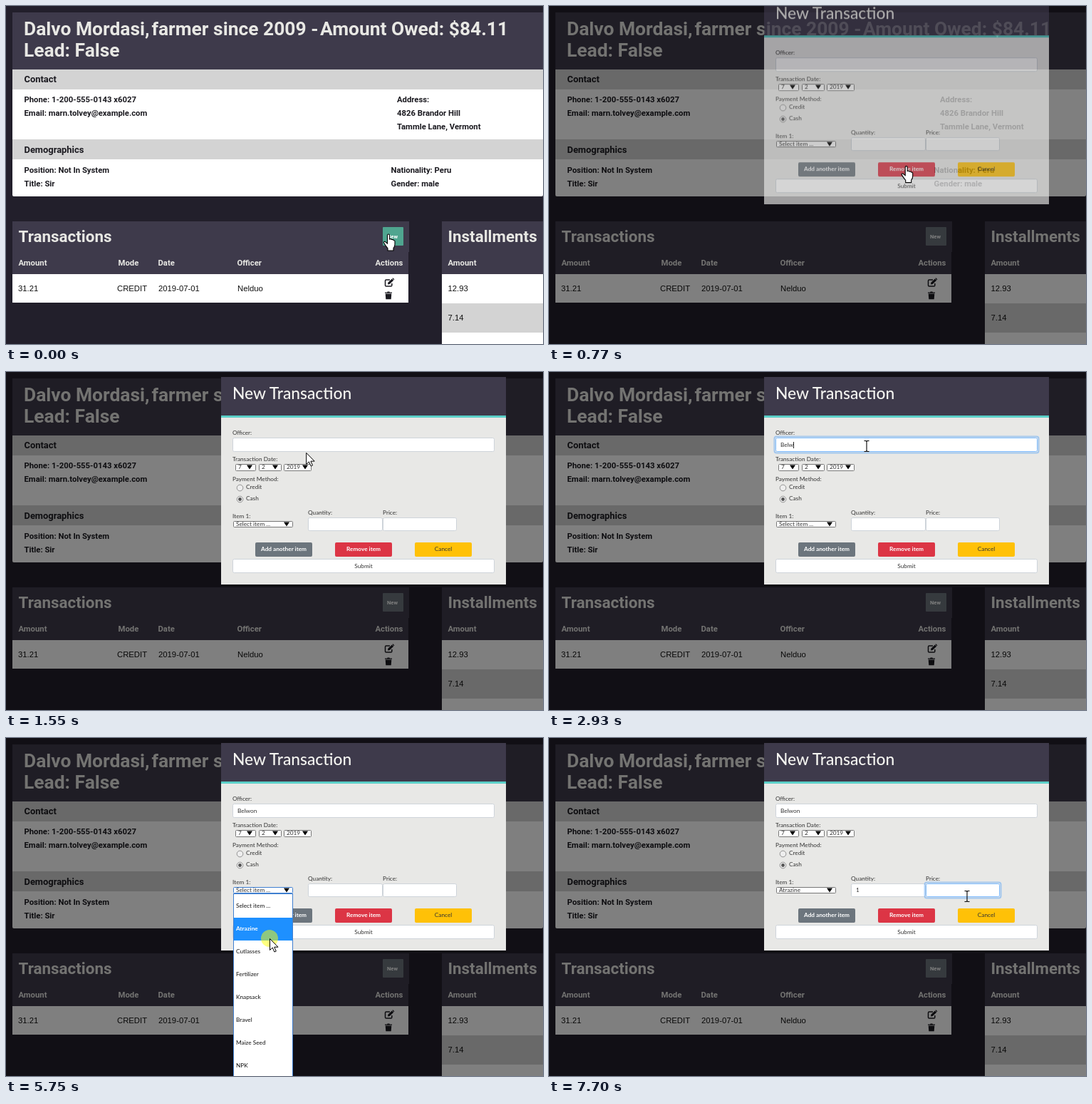
Animation of 754 by 474 pixels, one loop 8 s. Source, as an HTML page:

```html
<!DOCTYPE html>
<html lang="en">
<head>
<meta charset="utf-8">
<title>New transaction form</title>
<style>
  html, body { margin: 0; width: 100%; height: 100%; overflow: hidden; background: #221f2b; }
  svg { display: block; width: 754px; height: 474px; }
  text { white-space: pre; }
  .bold { font-family: Roboto, sans-serif; font-weight: 700; }
  .cell { font: 11.3px "Liberation Sans", Arial, sans-serif; fill: #111; }
  .form { font-family: Lato, sans-serif; }
</style>
</head>
<body>
<svg id="stage" viewBox="0 0 754 474" xmlns="http://www.w3.org/2000/svg"></svg>
<script>
const LOOP = 8000;
const PANEL = '#3e3a4b', LIGHT = '#e8e8e4', DARK = '#1b1a20', GREY = '#d3d3d3';
const OFFICER = 'Belwon';
const ITEMS = ['Select item ...', 'Atrazine', 'Cutlasses', 'Fertilizer', 'Knapsack', 'Bravel', 'Maize Seed', 'NPK'];

const rect = (x, y, w, h, fill, extra = '') =>
  `<rect x="${x}" y="${y}" width="${w}" height="${h}" fill="${fill}" ${extra}/>`;
const bold = (x, y, size, str, fill = DARK) =>
  `<text class="bold" x="${x}" y="${y}" font-size="${size}" fill="${fill}">${str}</text>`;
const cell = (x, y, str) => `<text class="cell" x="${x}" y="${y}">${str}</text>`;
const form = (x, y, str, extra = '') =>
  `<text class="form" x="${x}" y="${y}" font-size="8.25" fill="#333" ${extra}>${str}</text>`;

const field = (id, x, y, w, h) =>
  rect(x - 1.5, y - 1.5, w + 3, h + 3, 'none', `id="${id}Ring" rx="3" stroke="#007bff" stroke-opacity=".3" stroke-width="2"`) +
  rect(x + .5, y + .5, w - 1, h - 1, '#fff', `id="${id}" rx="2" stroke="#ced4da"`);
const select = (x, y, w, h, str, id = 'pick' + x) =>
  rect(x + .5, y + .5, w - 1, h - 1, '#fff', `id="${id}" rx="1" stroke="#777"`) +
  form(x + 4, y + 7.4, str, `id="${id}Text"`) +
  `<path d="M${x + w - 13} ${y + 1.5}h8l-4 6z" fill="#000"/>`;
const button = (x, fill, str, ink, weight) =>
  rect(x, 239, 80, 20, fill, 'rx="2"') +
  form(x + 40, 251, str, `text-anchor="middle" style="fill:${ink};font-weight:${weight}"`);
const radio = (y, str, on) =>
  `<circle cx="328.5" cy="${y}" r="4.3" fill="#eee" stroke="#888" stroke-width=".9"/>` +
  (on ? `<circle cx="328.5" cy="${y}" r="2.4" fill="#555"/>` : '') + form(337, y + 1.6, str);

const profile =
  rect(9, 9, 745, 80, PANEL) + rect(9, 89, 745, 178, '#fff', 'rx="2"') +
  rect(9, 89, 745, 28, GREY) + rect(9, 187, 745, 28, GREY) +
  bold(25, 41, 26.4, 'Dalvo Mordasi,', LIGHT) + bold(204.5, 41, 26.4, 'farmer since 2009 -', LIGHT) +
  bold(441, 41, 26.4, 'Amount Owed: $84.11', LIGHT) + bold(25, 71, 26.4, 'Lead: False', LIGHT) +
  bold(25.5, 107, 12.9, 'Contact') + bold(25.5, 206, 12.9, 'Demographics') +
  [[25.5, 135, 'Phone: 1-200-555-0143 x6027'], [25.5, 154, 'Email: marn.tolvey@example.com'],
   [549, 135, 'Address:'], [549, 154, '4826 Brandor Hill'], [549, 173, 'Tammle Lane, Vermont'],
   [25.5, 234, 'Position: Not In System'], [25.5, 253, 'Title: Sir'],
   [540.5, 234, 'Nationality: Peru'], [540.5, 253, 'Gender: male']]
    .map(([x, y, str]) => bold(x, y, 11.3, str)).join('');

const editIcon = `<path d="M539 384h-5.2q-1.300 0-1.300 1.300v6.400q0 1.300 1.300 1.300h6.700q1.300 0 1.300-1.300V389" fill="none" stroke="${DARK}" stroke-width="1.500"/>
  <path d="M536 390.500l.4-2.700 5.500-5.400 2.300 2.300-5.500 5.400z" fill="${DARK}"/><path d="M542.400 382l.9-.7 2 2-.8.9z" fill="${DARK}"/>`;
const trashIcon = `<path d="M532 401.500h3l.7-1h2.600l.7 1h3v1.300h-10zM532.700 403.600h8.600l-.6 7.600h-7.400z" fill="${DARK}"/>`;

const tables =
  rect(9, 302, 557, 43, PANEL) + rect(9, 345, 556, 31, PANEL) + rect(9, 376, 556, 40, '#fff') +
  bold(17.500, 330.500, 22.4, 'Transactions', LIGHT) +
  [[17.500, 'Amount'], [157.500, 'Mode'], [213.500, 'Date'], [324.500, 'Officer'], [518.500, 'Actions'], [620.500, 'Amount']]
    .map(([x, str]) => [x, str]);
const heads = [[17.5, 'Amount'], [157.5, 'Mode'], [213.5, 'Date'], [324.5, 'Officer'], [518.5, 'Actions'], [620.5, 'Amount']]
  .map(([x, str]) => bold(x, 364, 11.3, str, LIGHT)).join('');

const lists =
  rect(9, 302, 557, 43, PANEL) + rect(9, 345, 556, 31, PANEL) + rect(9, 376, 556, 40, '#fff') +
  rect(612, 302, 142, 74, PANEL) + rect(612, 376, 142, 98, '#fff') + rect(612, 417, 142, 41, GREY) +
  bold(17.5, 330.5, 22.4, 'Transactions', LIGHT) + bold(620.5, 330.5, 22.4, 'Installments', LIGHT) + heads +
  cell(17, 400, '31.21') + cell(156, 400, 'CREDIT') + cell(214, 400, '2019-07-01') + cell(325, 400, 'Nelduo') +
  cell(620.5, 400, '12.93') + cell(620.5, 441, '7.14') + editIcon + trashIcon +
  rect(529, 310, 29, 26, '#6c757d', 'id="newButton" rx="1"') + bold(535, 326, 7.6, 'New', '#fff');

const modal =
  rect(302, 7, 400, 291, '#e8e8e6') + rect(302, 7, 400, 54, PANEL) + rect(302, 61, 400, 3, '#5bcfc8') +
  `<text class="form" x="318" y="38" font-size="22.8" font-weight="500" fill="#f4f4f0">New Transaction</text>` +
  form(318, 88, 'Officer:') + field('officer', 318, 92, 368, 20) + form(325, 104.5, '', 'id="officerText"') +
  form(318, 124.5, 'Transaction Date:') +
  select(322, 129, 29, 10, '7') + select(355, 129, 32, 10, '2') + select(390, 129, 39, 10, '2019') +
  form(318, 152.5, 'Payment Method:') + radio(162.5, 'Credit') + radio(178.5, 'Cash', true) +
  form(318, 204.5, 'Item 1:') + form(424, 200, 'Quantity:') + form(529, 200, 'Price:') +
  select(319, 209, 84, 9, ITEMS[0], 'item') +
  field('qty', 424, 204, 105, 19) + field('price', 529, 204, 104, 19) + form(431, 216, '', 'id="qtyText"') +
  button(350, '#6c757d', 'Add another item', '#fff', 700) +
  button(462, '#dc3545', 'Remove item', '#fff', 700) +
  button(574, '#ffc107', 'Cancel', '#333', 400) +
  rect(318.5, 262.5, 367, 19, '#fff', 'rx="2" stroke="#ced4da"') +
  form(502, 274.5, 'Submit', 'text-anchor="middle"') +
  rect(0, 98, 1, 9, '#222', 'id="caret"');

const menu =
  rect(319.5, 218.5, 83, 270, '#fff', 'stroke="#3f7fd0"') +
  rect(320, 0, 82, 32, '#1e90ff', 'id="hover"') +
  ITEMS.map((str, i) => form(323, 238 + 32 * i, str, `id="option${i}"`)).join('');

const pointers = `
  <path id="arrow" d="M.5.5V16.500l3.700-3.500 2.700 6 2.400-1-2.600-5.800H12z" fill="#fff" stroke="#000" stroke-width="1"/>
  <path id="hand" d="M-1.500 13V1.800Q-1.500 0 0 0t1.500 1.800V7q1.700-1 3 .6 1.700-.6 2.500.9 2-.2 2 1.800v4.200q0 2.500-2 5V23h-8v-3.200q-3-3.500-5.500-7.800-.5-2 1.700-1.600z"
    fill="#fff" stroke="#000" stroke-width="1.100"/>
  <path id="beam" d="M-3.500-7.500h2.500l1 1 1-1h2.500M0-6.500V7M-3.500 7.500h2.500l1-1 1 1h2.500" fill="none" stroke="#000" stroke-width="1.100"/>`;

document.getElementById('stage').innerHTML =
  rect(0, 0, 754, 474, '#221f2b') + profile + lists +
  rect(0, 0, 754, 474, '#000', 'id="shade"') +
  `<g id="modal">${modal}</g><g id="menu">${menu}</g>` +
  `<g id="pointer"><circle id="halo" r="12" fill="#ff0" fill-opacity=".5"/>${pointers}</g>`;

const $ = id => document.getElementById(id);
const set = (id, name, value) => $(id).setAttribute(name, value);
const show = (id, on) => set(id, 'visibility', on ? 'visible' : 'hidden');
const clamp = v => Math.max(0, Math.min(1, v));
const within = (t, spans) => spans.some(([a, b]) => t >= a && t < b);

// time, x, y, pointer shape from that time on
const PATH = [
  [0, 537, 320, 'hand'], [310, 537, 320, 'hand'], [400, 535, 309, 'arrow'], [610, 528, 290, 'arrow'],
  [730, 509, 242, 'hand'], [770, 502, 225, 'hand'], [840, 482, 194, 'arrow'], [1080, 434, 134, 'arrow'],
  [1150, 423, 120, 'arrow'], [1400, 423, 120, 'arrow'], [1550, 421, 113, 'arrow'], [1625, 434, 106, 'beam'],
  [1700, 446, 104, 'beam'], [4020, 446, 104, 'beam'], [4100, 425, 120, 'arrow'], [4260, 378, 162, 'arrow'],
  [4400, 378, 162, 'arrow'], [4500, 372, 203, 'arrow'], [4720, 372, 203, 'arrow'], [4800, 371, 213, 'arrow'],
  [5040, 371, 213, 'arrow'], [5520, 370, 280, 'arrow'], [5600, 370, 281, 'arrow'], [5910, 370, 281, 'arrow'],
  [6130, 440, 224, 'beam'], [6220, 478, 214, 'beam'], [6840, 478, 214, 'beam'], [7000, 587, 222, 'beam'],
  [LOOP, 587, 222, 'beam']
];
const CLICKS = [[80, 310], [1630, 1780], [4800, 4880], [5750, 5910], [6230, 6380], [7150, 7320]];
const KEYS = [2710, 2780, 2860, 2930, 3160, 3240];
const FOCUS = { officer: [1700, 4800], qty: [6300, 7230], price: [7230, LOOP] };
const CARET = [[1700, 2240], [2710, 3710], [4210, 4800], [6300, 7700]];

function pointerAt(t) {
  const i = PATH.findIndex((key, k) => t < PATH[k + 1][0]);
  const [t0, x0, y0, shape] = PATH[i], [t1, x1, y1] = PATH[i + 1];
  const p = (t - t0) / (t1 - t0);
  return { x: x0 + (x1 - x0) * p, y: y0 + (y1 - y0) * p, shape };
}

function draw(t) {
  const { x, y, shape } = pointerAt(t);
  set('pointer', 'transform', `translate(${x.toFixed(1)} ${y.toFixed(1)})`);
  for (const id of ['arrow', 'hand', 'beam']) show(id, id === shape);
  show('halo', within(t, CLICKS));
  set('newButton', 'fill', t < 80 ? '#4fa58f' : t < 310 ? '#489883' : t < 400 ? '#4fa58f' : '#6c757d');

  set('shade', 'opacity', .5 * clamp((t - 525) / 150));
  const slide = 1 - (1 - clamp((t - 660) / 300)) ** 2;
  set('modal', 'opacity', clamp((t - 660) / 165));
  set('modal', 'transform', `translate(0 ${(-50 * (1 - slide)).toFixed(1)})`);

  let focused = '';
  for (const id in FOCUS) {
    const on = within(t, [FOCUS[id]]);
    if (on) focused = id;
    set(id, 'stroke', on ? '#80bdff' : '#ced4da');
    set(id + 'Ring', 'opacity', on ? 1 : 0);
  }
  $('officerText').textContent = OFFICER.slice(0, KEYS.filter(k => t >= k).length);
  $('qtyText').textContent = t >= 6770 ? '1' : '';
  $('itemText').textContent = ITEMS[t >= 5910 ? 1 : 0];
  set('item', 'stroke', within(t, [[4800, 6300]]) ? '#3f7fd0' : '#777');

  const typed = id => $(id).getComputedTextLength();
  const caretX = { officer: 325 + typed('officerText'), qty: 431 + typed('qtyText'), price: 536 }[focused] || 0;
  set('caret', 'x', Math.round(caretX));
  set('caret', 'y', focused === 'officer' ? 98 : 210);
  set('caret', 'opacity', within(t, CARET) ? 1 : 0);

  const open = t >= 4880 && t < 5910;
  const active = Math.max(0, Math.floor((y - 220) / 32));
  set('menu', 'display', open ? 'inline' : 'none');
  set('hover', 'y', 220 + 32 * active);
  ITEMS.forEach((_, i) => {
    set('option' + i, 'fill', i === active ? '#fff' : '#111');
    set('option' + i, 'font-weight', i === active ? 700 : 400);
  });
}

const start = performance.now();
function tick() {
  draw((performance.now() - start) % LOOP);
  requestAnimationFrame(tick);
}
draw(0);
requestAnimationFrame(tick);
</script>
</body>
</html>
```
